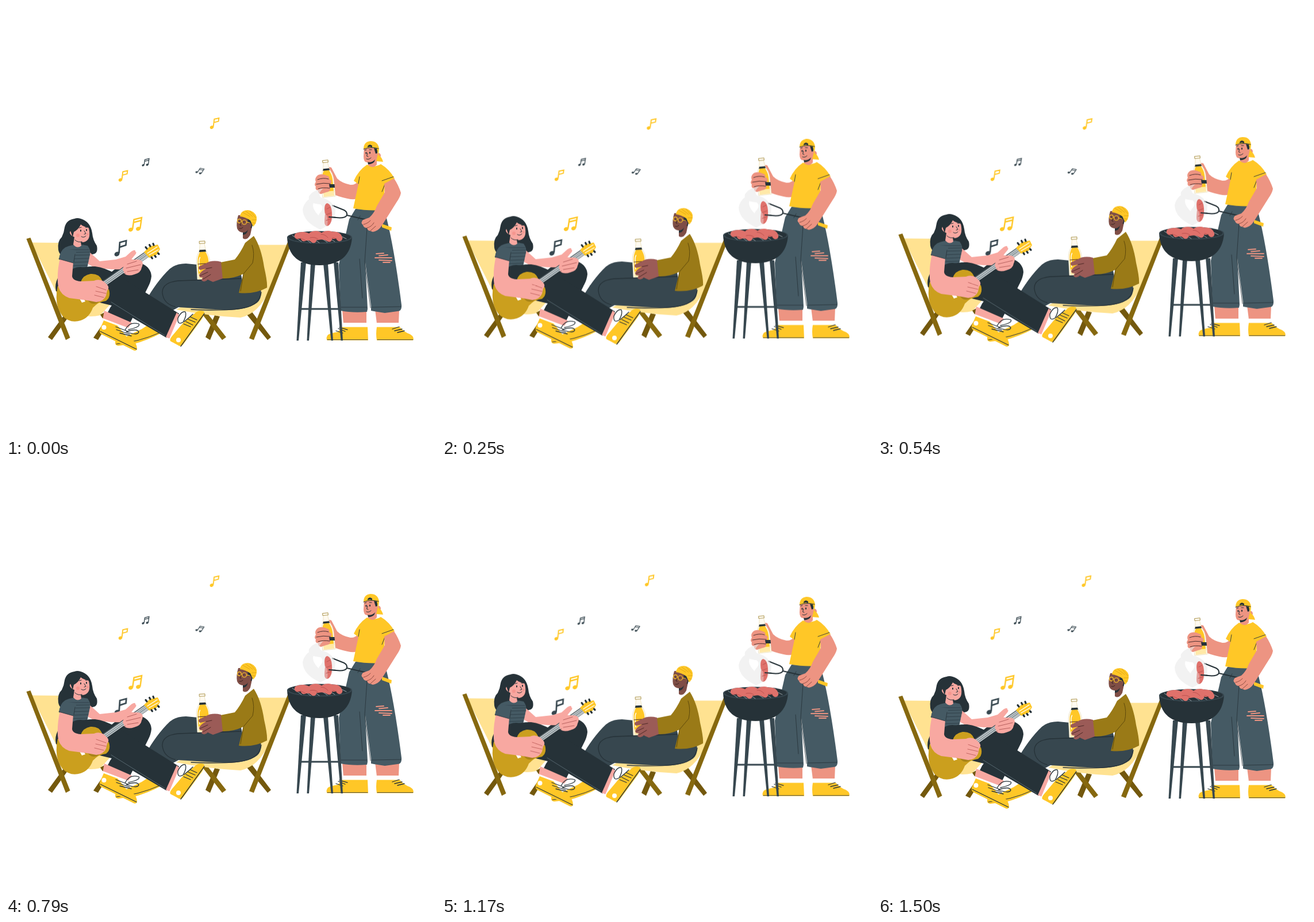
Recreate the animation shown at these times as an HTML page. Size 748x748 px, loop 1540 ms.

```html
<!DOCTYPE html>
<html lang="en">
<head>
<meta charset="utf-8">
<title>Barbecue</title>
<style>
html, body { margin: 0; width: 100%; height: 100%; overflow: hidden; background: #fff; }
svg { display: block; width: 100%; height: 100%; }
#notes { transform-origin: 280px 314px; }
.y { fill: #ffc727; }
.pale { fill: #ffe291; }
.wood { fill: #86680f; }
.woodDark { fill: #73580d; }
.ink { fill: #263238; }
.slate { fill: #37474f; }
.jean { fill: #455a64; }
.pink { fill: #f8a8a1; }
.tan { fill: #ed9482; }
.brown { fill: #7f4e46; }
.hand { fill: #9b5b57; }
.olive { fill: #9a7a17; }
.gold { fill: #cb9f1e; }
.meat { fill: #df716b; }
.w { fill: #fff; }
.line { fill: none; stroke: #263238; stroke-linecap: round; stroke-linejoin: round; }
.soft { stroke: #6b7d86; }
.white { stroke: #fff; }
</style>
</head>
<body>
<svg viewBox="0 0 748 748">
<defs>
  <g id="single">
    <ellipse rx="3.3" ry="2.7" transform="rotate(-25)"/>
    <path d="M2.6-1 4.3-14.3 12.4-16 11.6-10.4 3.6-8.3" fill="none" stroke="currentColor" stroke-width="1.9"/>
  </g>
  <g id="pair">
    <ellipse rx="4" ry="3.2" transform="rotate(-25)"/>
    <ellipse cx="13" cy="-1.5" rx="4" ry="3.2" transform="rotate(-25 13 -1.5)"/>
    <path d="M3.2-1 5.5-17.5 19-21 16.3-2M5-12.5 18.3-16" fill="none" stroke="currentColor" stroke-width="2.4"/>
  </g>
  <g id="bottle">
    <path d="M-4.500-66H4.500L4-60 5.500-50Q11-41 11.500-33V0H-11.500V-33Q-11-41-5.500-50L-4-60Z" fill="#fffaf0" stroke="#eadfb8" stroke-width=".8"/>
    <path class="y" d="M-4.500-48H4.500Q9.500-39 9.500-31V-7H-9.500V-31Q-9.500-39-4.500-48Z"/>
    <path d="M-9.500-10H9.500V-1H-9.500Z" fill="#ffe9a8"/>
    <path class="ink" d="M-5.200-51H5.200L6.200-47.500H-6.200Z"/>
    <path d="M-5-66H5M-5-62H5M-5-66V-62M5-66V-62" fill="none" stroke="#a18a42" stroke-width=".8"/>
    <path class="line white" d="M-5-38Q-7-35-7-29V-14" stroke-width="1.4"/>
  </g>
</defs>

<g id="notes">
  <g fill="#ffc727" color="#ffc727">
    <use href="#single" transform="translate(358 211)"/>
    <use href="#single" transform="translate(199 302.500)"/>
    <use href="#pair" transform="translate(217 389)"/>
  </g>
  <g fill="#37474f" color="#37474f">
    <use href="#single" transform="translate(193 431.500) rotate(-3) scale(1.4)"/>
    <use href="#pair" transform="translate(238.500 277) scale(.55)"/>
    <use href="#pair" transform="translate(331.500 289) rotate(25) scale(.5)"/>
  </g>
</g>

<g id="party">
  <!-- chairs -->
  <path class="pale" d="M44 411.500 102 412 125 500 186 514 164 538Q135 545 108 528L88 499Z"/>
  <path class="woodDark" d="M164 537 171 533 183 552 176 556ZM172 548 178 552 160 581 152 577Z"/>
  <path class="woodDark" d="M103 535 110 539 80 581 73 576Z"/>
  <path class="wood" d="M35.500 405 42.500 403 111.500 577 104 581Z"/>
  <path class="woodDark" d="M363 538 372 540 355 581 347 576Z"/>
  <path class="wood" d="M342 537 350 534 383 576 376 581Z"/>
  <path class="woodDark" d="M419 537 427 531 461 576 455 581Z"/>
  <path class="pale" d="M430 415.500H494Q478 458 458 494 440 535 408 542 350 539 296 528L330 510 430 490Z"/>
  <path class="wood" d="M491 408H498.500L431 581 423 578Z"/>

  <!-- seated man -->
  <path class="y" d="M190 584Q192 578 207 576L236 562 256 549 272 568Q245 582 222 588L195 591Q189 590 190 584Z"/>
  <path class="line" d="M192 588Q230 585 268 568"/>
  <path class="slate" d="M247 506Q262 481 279 463 291 448 313 448L365 453 408 466 443 492Q446 508 437 516 420 529 380 529L300 524 262 545Z"/>
  <path class="line" d="M410 474 300 478Q271 481 272 499 274 518 294 523M322 528Q400 532 425 522 442 514 444 498" stroke-width="1.300"/>
  <path class="w" d="M413 398 424 399 420 470 411 477 409 468 395 440Q397 413 413 398Z"/>
  <path class="brown" d="M404 364Q400 377 402 387 405 394 412 394L412 404Q419 409 425 398L429 379 425 363Z"/>
  <path class="ink" d="M420 368Q429 368 430 378L427 387 422 381ZM412 394Q418 394 421 389 419 398 412 398Z"/>
  <ellipse class="brown" cx="424" cy="381" rx="3" ry="4"/>
  <path class="y" d="M408 362Q411 355 421 355 433 357 436 367 437 377 430 384L425 373Q416 367 407 366Z"/>
  <path class="line" d="M412 359 424 366M417 357 429 366M424 356 434 368M428 372 435 372M428 377 434 378" style="stroke:#d8a111" stroke-width=".8"/>
  <g fill="none" stroke="#ffc727" stroke-width="1.200"><circle cx="406" cy="374" r="3.300"/><circle cx="414.500" cy="376" r="4"/><path d="M418.500 376 424 377"/></g>
  <path class="line" d="M406 374V375M414 375V376M409 376 407 381 409 382M406 387Q410 388 412 385" style="stroke:#35201d"/>
  <path class="olive" d="M416 412 431 400Q444 420 449 454 455 480 454 490 432 502 405 499L413 466Q394 475 376 474L373 446 398 441Q408 429 416 412Z"/>
  <path class="line" d="M428 416Q433 430 429 447L413 466 408 496" style="stroke:#5f4a0b"/>
  <use href="#bottle" transform="translate(344.500 475) rotate(-3)"/>
  <path class="hand" d="M374 445Q358 441 347 448L336 453Q333 457 338 459L348 457Q338 462 336 468 336 473 342 472L340 477Q345 482 351 476L360 480 377 474Z"/>
  <path class="line" d="M348 457 358 455M338 469 351 463M343 475 356 467M334 449 347 448" style="stroke:#4c2826"/>

  <!-- guitarist -->
  <path class="ink" d="M183 463Q205 444 234 447 252 454 253 470 252 480 247 489L216 551 176 535Q184 515 205 500Z"/>
  <path class="pink" d="M171 530 219 551 212 561 168 546Z"/>
  <path class="w" d="M168 543 213 560 207 569 169 551Z"/>
  <path class="y" d="M170 547 194 556Q204 568 212 578 227 581 228 596 227 601 222 599L166 571Q162 569 163 563Z"/>
  <circle class="w" cx="170.500" cy="559" r="4"/>
  <path class="line" d="M164 566 227 597M191 558 212 566M192 563 215 571M198 569 218 574M207 564Q214 548 231 553 235 558 213 563M209 567Q228 560 231 567 229 574 210 567" stroke-width="1.300"/>
  <path class="ink" d="M119 370Q105 372 102 385 101 394 97 402 89 409 91 424 92 431 98 435L150 432Q161 431 158 417 151 407 150 395 147 375 130 370 124 368 119 370Z"/>
  <path class="ink" d="M92 470Q84 482 87 496L118 510 160 470 130 448Z"/>
  <path class="pink" d="M143 426 163 444 191 441 208 436 218 427Q226 422 225 428L216 440 232 443Q240 448 236 455 235 464 223 467 212 471 205 465L203 458Q176 459 152 454L136 445Z"/>
  <path class="jean" d="M103 420Q121 412 142 417 148 425 146 433L141 456Q122 450 110 462L92 440Q94 426 103 420Z"/>
  <path class="line" d="M102 424H144M99 429 145 428M96 434 146 433M113 440 144 439M116 446 143 445M114 452 142 451" style="stroke:#2c3c45" stroke-width=".8"/>
  <path class="pink" d="M114 385Q118 378 133 379 144 380 145 392 147 409 134 411L130 410 131 417Q124 423 117 415L119 402Q113 400 111 395 111 390 116 391Z"/>
  <path class="ink" d="M112 391Q114 376 129 375 136 373 145 386 135 384 130 380 126 389 118 393L116 402Z"/>
  <path class="line" d="M130 390V391.500M140 389V390.500" stroke-width="2"/>
  <path class="line" d="M127 386 131 385M138 385 141 385M136 391 139 396 136 397M131 401Q135 404 139 400M120 407Q125 412 132 410"/>
  <circle cx="125" cy="399" r="3" fill="#f5968f"/><circle cx="142" cy="397" r="2" fill="#f5968f"/>
  <path class="ink" d="M111 467Q125 452 155 453 172 455 191 466L301 535 279 577 184 521 130 508Z"/>
  <path class="line soft" d="M183 515 276 573M290 571 299 536" stroke-width=".7"/>
  <path class="pink" d="M297 533 303 540 286 579 278 576Z"/>
  <path class="w" d="M301 539 313 544 294 581 284 579Z"/>
  <path class="y" d="M310 549 328 535Q335 528 344 531 347 533 341 544L308 589Q304 594 299 590L286 583Q284 580 289 574Z"/>
  <circle class="w" cx="300" cy="581" r="4"/>
  <path class="line" d="M304 592 345 535M309 553 321 558M313 549 325 555M317 545 329 550M321 541 332 546M308 550Q298 556 299 543 305 530 312 532 315 538 308 550M310 549Q320 541 325 536" stroke-width="1.300"/>

  <!-- guitar -->
  <path class="gold" d="M90 487Q83 520 98 539 112 553 130 547 145 542 151 525 161 514 174 513 183 506 179 493 166 490 167 477 162 465 147 466 134 468 130 480 112 493 90 487Z"/>
  <circle cx="153" cy="506" r="12" fill="#a88318"/>
  <path class="w" d="M124 502 130 500 138 514 132 516Z"/>
  <path d="M144 501 245 431" fill="none" stroke="#8b979c" stroke-width="9"/>
  <path class="line white" d="M145 498 245 428M146 501 245 431M148 504 246 434" stroke-width=".8"/>
  <path class="line" d="M143 497 243 427M149 506 248 436" stroke-width=".8"/>
  <path class="y" d="M240 428 250 418 264 415 268 423 262 433 249 438Z"/>
  <path class="line" d="M245 422 243 419.500M251 418 249.500 415.500M257 416 256 413.500M253 437 254.500 439M259 434.500 260.500 436.500M264.500 430 266 431.500" stroke-width="3.200"/>
  <path class="line white" d="M246 430 263 419M249 433 265 424" stroke-width="1.400"/>
  <path class="pink" d="M94 439 117 446 115 470Q116 478 130 479L153 478Q161 474 170 479L177 486Q180 491 176 495L174 504Q170 514 157 515L141 512 110 508Q91 501 90 481 89 459 94 439Z"/>
  <path class="jean" d="M101 422 92 440 117 447 123 425Z"/>
  <path class="line" d="M92 440 117 447M118 445 120 432" stroke-width=".8"/>
  <path class="line" d="M157 488 174 494M156 496 174 500M154 503 170 507" style="stroke:#c46662"/>
  <path class="pink" d="M208 441Q216 434 222 429 228 425 226 431L217 442Q234 439 237 445 240 450 234 453 238 458 230 461 228 467 217 466 206 468 203 458Z"/>
  <path class="line" d="M211 449 227 444M209 456 234 450M211 462 230 459" style="stroke:#b65f5d"/>

  <!-- cook -->
  <path class="tan" d="M585 529H627V552H587ZM642 528H684L683 552H645Z"/>
  <path class="w" d="M586 551H628V560H586ZM645 551H685V560H645Z"/>
  <path class="y" d="M585 558.500H629L630 581.500H558.500Q556 577 560 572 565 569 577 567ZM645 558.500H685Q692 567 703 571 711 576 708 581.500H645Q643 570 645 558.500Z"/>
  <path class="line" d="M559 580.500H629M646 580.500H708" stroke-width=".8"/>
  <path class="line" d="M578 561 590 566M574 565 586 569M580 559 594 563M672 562 684 558M676 565 689 562M681 568 693 565" stroke-width="1.300"/>
  <path class="jean" d="M608 353 658 354Q674 410 688 520 689 531 681 531L659 534 640 531 635 530 635 522L625 446 629 527 628 532Q602 534 582 530L579 450 597 371Z"/>
  <path class="line" d="M629 372 624 445 634 525M615 440 620 508M583 524H628M637 524 687 523M616 365 612 372" stroke-width=".8"/>
  <path class="line" d="M644 431 657 430M649 434.500 664 433M642 438 671 438M649 442 671 443M656 446 668 446" stroke-width="1.800" style="stroke:#ed9482"/>
  <path class="tan" d="M614 304Q607 312 599 311 584 308 576 300L566 281Q560 278 561 286L564 304 563 325Q579 332 594 335 607 338 613 334Z"/>
  <path class="y" d="M628 276Q640 282 652 275 667 284 676 300L659 310 657 355Q630 357 604 352L613 310 605 304Q613 286 628 276Z"/>
  <path class="line" d="M654 304 674 297M613 309 615 297M659 310 654 323" stroke-width=".9"/>
  <path class="tan" d="M623 246 646 245 646 256Q652 255 652 261 650 266 645 265L645 276Q638 284 630 277L630 272Q622 273 622 262Z"/>
  <path class="ink" d="M640 247H647L646 256 643 257ZM629 271.500Q637 273 642 267 641 275 630 275.500Z"/>
  <path class="y" d="M622 249Q622 236 634 235 647 235 649 248L648 259Q654 263 656 271L644 270 647 257 645 248Q633 245 622 249Z"/>
  <path class="ink" d="M629 244Q632 239 637 243L637 246Q632 244 629 246Z"/>
  <path class="line" d="M626.500 255V256.500M633 254.500V256" stroke-width="2"/>
  <path class="line" d="M624 251 627 250M632 250 636 250M629 256 627.500 261 630 262M627 266Q631 268 635 264M622 249Q635 244 648 248"/>
  <use href="#bottle" transform="translate(562 332) rotate(-6) scale(.97)"/>
  <path class="tan" d="M543 294Q550 291 558 295 564 297 562 301 569 304 565 309 569 313 564 317 565 323 557 324L548 327Q542 326 543 321 537 320 539 314 535 311 539 306 536 299 543 294Z"/>
  <path class="line" d="M542 302Q552 298 561 301M540 310Q552 307 564 309M543 318Q552 315 563 317" style="stroke:#4a3031"/>
  <path class="ink" d="M562 310H571.500L572 316H563Z"/>
  <path class="line" d="M568 347 588 355Q594 358 593 364 589 371 567 367M593 364 632 373" stroke-width="2"/>
  <path class="y" d="M654 379 671 385 670 391 654 385Z"/>
  <path class="tan" d="M675 300Q683 312 687 325 686 332 679 342L662 369Q657 377 653 383 648 391 638 393L633 391Q629 391 628 386 622 386 621 381 616 377 621 372L632 368Q641 360 645 348L659 324 658 309Z"/>
  <path class="line" d="M622 380Q630 378 634 373M628 386Q636 384 640 377M634 391 643 383" style="stroke:#8e4c43"/>

  <!-- grill -->
  <g class="slate">
    <path d="M513 446H522L509 582H505.500Z"/><path d="M530 448H538L527 582H523.500Z"/>
    <path d="M552 448H560L569 582H565.500Z"/><path d="M570 446H578L586 582H582.500Z"/>
    <path d="M511 525.500H581V528.500H511Z"/>
  </g>
  <path class="ink" d="M489 402Q491 451 546 451 599 450 602 402Z"/>
  <ellipse class="slate" cx="545.500" cy="402.500" rx="56.500" ry="11"/>
  <ellipse class="ink" cx="545.500" cy="402" rx="54" ry="9.500"/>
  <path class="line" d="M498 399 514 410M508 396 530 412M520 394 545 412M532 393 559 411M545 393 572 410M558 393 583 408M572 395 592 405" stroke-width=".9" style="stroke:#a8b2b7"/>
  <path class="line" d="M507 400Q518 396 526 401M518 404Q529 400 535 407M532 398Q541 394 549 401M542 402Q553 399 562 405M553 398Q562 394 570 400M567 398Q578 397 580 404" stroke-width="10.500" style="stroke:#df716b"/>
  <path class="line" d="M505 405Q514 403 521 408M529 403Q538 401 543 406M548 397Q555 397 560 403M568 403Q573 403 576 407" stroke-width=".9" style="stroke:#b64f4c"/>
  <g fill="#ebebeb" opacity=".62">
    <path d="M547 389Q517 376 516 354 519 336 543 328 531 342 535 352 540 363 552 371 556 380 547 389Z"/>
    <path d="M546 389Q537 373 546 360 555 351 547 345 524 344 527 331 533 321 552 317 541 327 548 333 569 338 573 355 573 378 546 389Z"/>
  </g>
  <path class="meat" d="M559 343Q566 345 567 359 568 377 561 382 554 385 554 374L555 362Q552 344 559 343Z"/>
  <path d="M555 360Q561 366 559 382 554 384 554 374Z" fill="#ebebeb" opacity=".4"/>
  <path class="line" d="M558 353 564 350M557 363 565 360M557 373 565 370" style="stroke:#bd5551"/>
  <path class="line" d="M562 367 574 368" stroke-width="2"/>
</g>
</svg>
<script>
const LOOP = 1540;
const bob = [[0, 0], [250, -3.6], [540, -7.2], [770, -9.3], [1000, -6.3], [1170, -3.9], [1500, 0], [1540, 0]];
const play = (id, frames) =>
  document.getElementById(id).animate(frames, { duration: LOOP, iterations: Infinity });

play('party', bob.map(([t, y]) => ({ offset: t / LOOP, transform: `translateY(${y}px)` })));

const sway = Array.from({ length: 25 }, (_, i) => ({
  offset: i / 24,
  transform: `rotate(${Math.sin(i / 24 * Math.PI * 2)}deg)`
}));
play('notes', sway);
</script>
</body>
</html>
```
